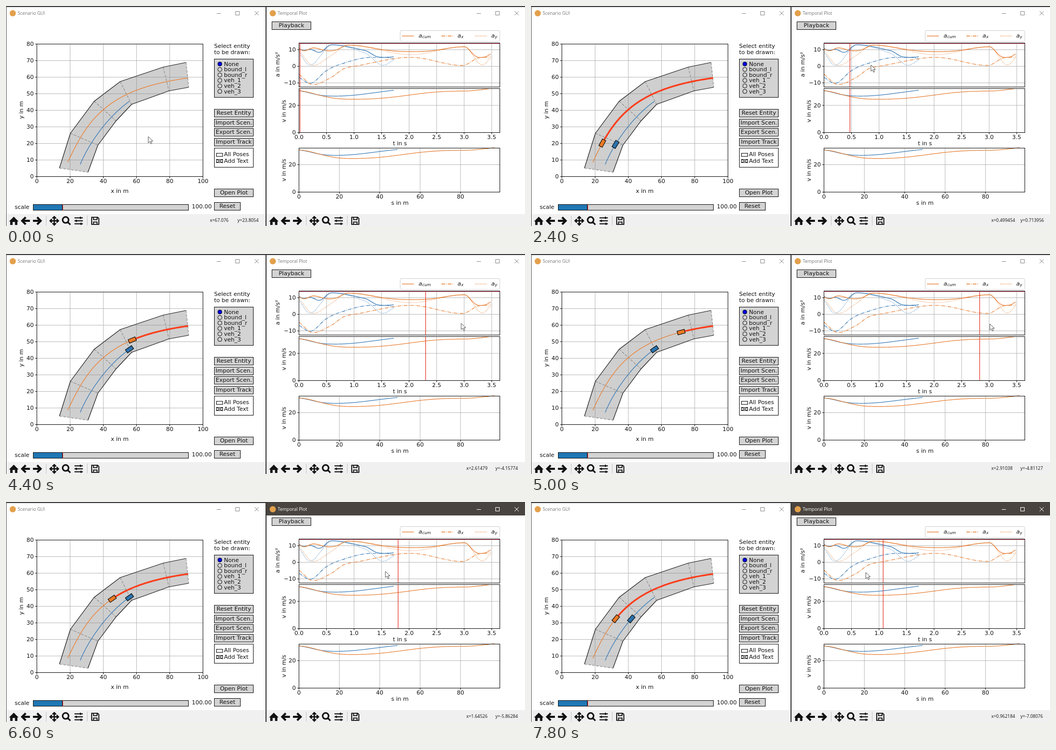
Write an HTML page with a canvas that moves like this. It is 1000 px wide and 425 px high and loops after 8 s.

```html
<!DOCTYPE html>
<html>
<head>
<meta charset="utf-8">
<style>
html, body { margin: 0; width: 100%; height: 100%; overflow: hidden; background: #fff; }
canvas { display: block; }
svg { position: absolute; width: 0; height: 0; }
</style>
</head>
<body>
<canvas id="stage" width="1000" height="425"></canvas>
<svg>
  <path id="inner" d="M143 306C160 264 198 212 238 184"/>
  <path id="outer" d="M119 302C160 213 200 160 351 139"/>
</svg>
<script>
const g = document.getElementById('stage').getContext('2d');
const LOOP = 8000, STEP = 200, ENTER = 1400, FOCUS = 5200, SAMPLES = 240;
const ORANGE = '#e8833a', BLUE = '#3f7fb8', GREY = '#d3d3d3', RED = '#e23b30';
const SANS = '"DejaVu Sans", sans-serif', UI = '"Open Sans", sans-serif';
const DASHDOT = [7, 2, 1.2, 2], DOTTED = [1.2, 2];

const segment = (rows, at) =>
  Math.max(0, Math.min(rows.length - 2, rows.findIndex(r => r[0] > at) - 1 + (at >= rows.at(-1)[0] ? rows.length : 0)));

// Monotone cubic through [key, value] points, so peaks never overshoot.
function spline(rows, at) {
  const i = segment(rows, at), [a, y] = rows[i], [b, z] = rows[i + 1], h = b - a, u = (at - a) / h;
  const secant = k => (rows[k + 1][1] - rows[k][1]) / (rows[k + 1][0] - rows[k][0]);
  const slope = k => {
    if (k === 0) return secant(0);
    if (k === rows.length - 1) return secant(k - 1);
    const p = secant(k - 1), q = secant(k);
    return p * q > 0 ? 2 * p * q / (p + q) : 0;
  };
  const m = slope(i) * h, n = slope(i + 1) * h, d = z - y;
  return y + u * (m + u * (3 * d - 2 * m - n + u * (m + n - 2 * d)));
}

// Speed is the integral of a_x, distance the integral of speed, position the distance along the path.
function drive({ id, color, fill, end, ax, ay }) {
  const path = document.getElementById(id), dt = end / SAMPLES, trace = [];
  let v = 30.8, s = 0;
  for (let i = 0; i <= SAMPLES; i++) {
    const t = i * dt, state = { t, v, s, ax: spline(ax, t), ay: spline(ay, t) };
    trace.push(state);
    v += state.ax * dt;
    s += v * dt;
  }
  const scale = path.getTotalLength() / trace[SAMPLES].s;
  for (const state of trace) {
    const { x, y } = path.getPointAtLength(state.s * scale);
    state.at = [x, y];
  }
  return { color, fill, trace, index: t => Math.min(SAMPLES, Math.round(t / dt)) };
}

const vehicles = [
  {
    id: 'inner', color: BLUE, fill: '#2b73b0', end: 1.72,
    ax: [[0, -6.7], [.2, -10.2], [.5, -2.6], [.71, .8], [1.32, 5.4], [1.6, 5.3], [1.72, 4.3]],
    ay: [[0, 8.5], [.2, .7], [.6, 13], [1.2, 8], [1.53, .6], [1.72, 3.8]]
  },
  {
    id: 'outer', color: ORANGE, fill: '#ec7a24', end: 3.48,
    ax: [[0, -4.8], [.26, -11.1], [.57, -7], [.85, -1], [1.04, .2], [2.03, 5.4], [2.97, .5], [3.28, 5.2], [3.48, 5.6]],
    ay: [[0, 9.5], [.26, .5], [.57, 6.2], [.9, 12.8], [2.03, 7], [3, 11.8], [3.33, .8], [3.48, 5]]
  }
].map(drive);

// time, pointer x and y, readout x and y, scrub position
const moves = [
  [0, 274.1432, 253.32272, 0, 0, .02],
  [1400, 568, 140, 0, 0, .02],
  [2400, 655, 115, .499454, .713956, .47],
  [3400, 773, 121, 1.76278, -1.47831, 1.66],
  [4400, 877, 135, 2.61479, -4.15774, 2.3],
  [5000, 884, 136, 2.91038, -4.81127, 2.83],
  [5600, 846, 131, 2.70293, -4.64484, 2.95],
  [6600, 731, 135, 1.64526, -5.86284, 1.8],
  [7800, 645, 137, .962184, -7.08076, 1.07]
];

function pose(time) {
  const i = segment(moves, time), [a, ...from] = moves[i], [b, ...to] = moves[i + 1];
  return from.map((v, k) => v + (to[k] - v) * (time - a) / (b - a));
}

const leftBound = [[103, 313], [124, 246], [170, 184], [220, 146], [303, 118], [347, 109]];
const rightBound = [[158, 321], [177, 269], [212, 222], [242, 190], [314, 164], [352, 157]];

function text(s, x, y, align = 'center', color = '#111', font = '11px ' + SANS) {
  g.font = font;
  g.textAlign = align;
  g.fillStyle = color;
  g.fillText(s, x, Math.round(y + 3.6));
}

function upright(s, x, y) {
  g.save();
  g.translate(x, y);
  g.rotate(-Math.PI / 2);
  text(s, 0, 0);
  g.restore();
}

function line(points, color = '#000', width = 1, dash = []) {
  g.beginPath();
  points.forEach(p => g.lineTo(...p));
  g.strokeStyle = color;
  g.lineWidth = width;
  g.setLineDash(dash);
  g.stroke();
  g.setLineDash([]);
}

function box(x, y, w, h, fill, stroke = '#111') {
  g.fillStyle = fill;
  g.fillRect(x, y, w, h);
  g.strokeStyle = stroke;
  g.lineWidth = 1;
  if (stroke) g.strokeRect(x + .5, y + .5, w - 1, h - 1);
}

function button(label, x, y, w) {
  box(x, y, w, 16, GREY);
  text(label, x + w / 2, y + 7);
}

// Ticks are [pixel, label]; an empty label leaves only the grid line.
const ticks = (n, start, gap, label) => Array.from({ length: n }, (_, i) => [start + i * gap, label(i)]);

function axes(x, y, w, h, xs, ys, draw) {
  xs.forEach(([p]) => line([[p, y], [p, y + h]], '#b4b4b4', .9));
  ys.forEach(([p]) => line([[x, p], [x + w, p]], '#b4b4b4', .9));
  draw();
  g.strokeStyle = '#111';
  g.lineWidth = 1;
  g.strokeRect(x, y, w, h);
  xs.filter(([, s]) => s !== '').forEach(([p, s]) => {
    line([[p, y + h], [p, y + h + 3]]);
    text(s, p, y + h + 9);
  });
  ys.forEach(([p, s]) => {
    line([[x - 3, p], [x, p]]);
    text(s, x - 6, p, 'right');
  });
}

function titleBar(x, title, active) {
  if (active) box(x, 1, 498, 25, '#49443f', null);
  const color = active ? '#fff' : '#8c8c8c';
  g.fillStyle = '#e3a04c';
  g.beginPath();
  g.arc(x + 12, 14, 6, 0, 7);
  g.fill();
  text(title, x + 21.5, 13.5, 'left', active ? '#fff' : '#777', '8.75px ' + UI);
  line([[x + 405, 14.5], [x + 413, 14.5]], color);
  g.strokeRect(x + 441.5, 10.5, 7, 7);
  line([[x + 478, 10], [x + 486, 18]], color);
  line([[x + 486, 10], [x + 478, 18]], color);
}

// Each icon is a centre, an outline and a stroke width, where 0 means filled.
const icons = [
  [15, 'M0-7-8 1h2v6h4V2h4v5h4V1h2z', 0],
  [38, 'M0-6-6 0 0 6M-6 0H7', 3.4],
  [60, 'M0-6 6 0 0 6M6 0H-7', 3.4],
  [93, 'M-7 0H7M0-7V7M-3-4 0-7 3-4M-3 4 0 7 3 4M-4-3-7 0-4 3M4-3 7 0 4 3', 2.2],
  [116, 'M4-1.5A5 5 0 1 1-6-1.5 5 5 0 1 1 4-1.5M2.5 2 7 6.5', 2.6],
  [140, 'M-7-5H7M-7 0H7M-7 5H7M3-7v4M-4-2v4M4 3v4', 1.8],
  [172, 'M-6-6H4L6-4V6H-6zM-3-6v4H3v-4M-3 6V2H3v4', 1.6]
].map(([x, d, width]) => [x, new Path2D(d), width]);

function toolbar(x) {
  box(x + 1, 402, 499, 23, '#f0f0f0', null);
  for (const [dx, shape, width] of icons) {
    g.save();
    g.translate(x + dx, 415);
    g.scale(1.15, 1.15);
    g.strokeStyle = g.fillStyle = '#111';
    g.lineWidth = width;
    width ? g.stroke(shape) : g.fill(shape);
    g.restore();
  }
  for (const dx of [77.5, 156.5]) line([[x + dx, 405], [x + dx, 424]], '#c4c4c4');
}

function readout(x, y, px, py) {
  const show = (name, v, at) =>
    text(`${name}=${Number(v.toPrecision(6))}`, at, 413.5, 'left', '#111', '8.5px ' + UI);
  show('x', x, px);
  show('y', y, py);
}

function car({ trace, fill, index }, t) {
  const i = index(t), a = trace[Math.max(i - 2, 0)].at, b = trace[Math.min(i + 2, SAMPLES)].at;
  g.save();
  g.translate(...trace[i].at);
  g.rotate(Math.atan2(b[1] - a[1], b[0] - a[0]));
  g.fillStyle = fill;
  g.fillRect(-7.2, -3.7, 14.4, 7.4);
  g.strokeStyle = '#111';
  g.lineWidth = 1.2;
  g.strokeRect(-7.2, -3.7, 14.4, 7.4);
  g.restore();
}

function track(t, scrubbing) {
  g.beginPath();
  [...leftBound, ...[...rightBound].reverse()].forEach(p => g.lineTo(...p));
  g.fillStyle = 'rgba(128,128,128,.38)';
  g.fill();
  leftBound.forEach((p, i) => line([p, rightBound[i]], '#999', 1.4, [5, 2.5]));
  line(leftBound, '#222', 1.2);
  line(rightBound, '#222', 1.2);
  vehicles.forEach(v => line(v.trace.map(q => q.at), v.color, 1.3));
  if (!scrubbing) return;
  const lead = vehicles[1];
  line(lead.trace.slice(lead.index(t)).map(q => q.at), '#f93e1c', 3.2);
  vehicles.forEach(v => car(v, t));
}

function scenario(t, scrubbing) {
  axes(59.5, 73.5, 320, 256, ticks(6, 59.5, 64, i => i * 20), ticks(9, 329.5, -32, i => i * 10),
    () => track(t, scrubbing));
  text('x in m', 219, 357);
  upright('y in m', 29, 201);

  text('Select entity', 401, 77, 'left');
  text('to be drawn:', 401, 89, 'left');
  box(401, 102, 76, 75, GREY);
  ['None', 'bound_l', 'bound_r', 'veh_1', 'veh_2', 'veh_3'].forEach((s, i) => {
    const y = 112 + i * 10.6;
    g.beginPath();
    g.arc(412, y, 4, 0, 7);
    g.fillStyle = i ? GREY : '#0000f0';
    g.fill();
    g.strokeStyle = '#111';
    g.stroke();
    text(s, 420, y, 'left');
  });
  ['Reset Entity', 'Import Scen.', 'Export Scen.', 'Import Track']
    .forEach((s, i) => button(s, 401, Math.round(199 + i * 18.7), 76));
  box(401, 274, 76, 38, '#fff');
  box(405, 284, 13, 7, '#fff');
  box(405, 296, 13, 7, '#fff');
  line([[405, 296], [418, 303]]);
  line([[405, 303], [418, 296]]);
  text('All Poses', 420, 286.5, 'left');
  text('Add Text', 420, 299, 'left');
  button('Open Plot', 401, 353, 76);
  button('Reset', 401, 379, 51);
  text('scale', 45, 388, 'right');
  box(52, 383, 300, 12, GREY);
  box(52, 383, 57, 12, '#1f77b4');
  line([[109.5, 383], [109.5, 395]], '#d03030');
  text('100.00', 358, 387, 'left');
}

function legend() {
  g.strokeStyle = '#d0d0d0';
  g.lineWidth = 1;
  g.beginPath();
  g.roundRect(759.5, 47.5, 192, 21, 2);
  g.stroke();
  [[763, 795, 'cum', []], [839, 870, 'x', DASHDOT], [904, 935, 'y', DOTTED]].forEach(([x, tx, sub, dash]) => {
    line([[x, 58], [x + 23, 58]], ORANGE, 1.3, dash);
    text('a', tx, 57, 'left', '#111', 'italic 11px ' + SANS);
    text(sub, tx + 7, 58.5, 'left', '#111', 'italic 7.7px ' + SANS);
  });
}

function temporal(t) {
  const LEFT = 564.5, WIDTH = 387, HEIGHT = 85;
  const X = s => LEFT + s * 106.1, A = a => 116.5 - a * 3.2;
  const seconds = ticks(8, LEFT, 53.05, i => (i / 2).toFixed(1));
  const curves = (point, width, dash) =>
    vehicles.forEach(({ trace, color }) => line(trace.map(point), color, width, dash));

  button('Playback', 512, 30, 76);
  legend();
  axes(LEFT, 71.5, WIDTH, HEIGHT, seconds.map(([p]) => [p, '']), ticks(3, 84.5, 32, i => ['10', '0', '−10'][i]), () => {
    curves(q => [X(q.t), A(Math.hypot(q.ax, q.ay))], 1.3);
    curves(q => [X(q.t), A(q.ax)], 1.2, DASHDOT);
    curves(q => [X(q.t), A(q.ay)], 1.1, DOTTED);
  });
  line([[LEFT, 72.5], [LEFT + WIDTH, 72.5]], '#c2405a');
  axes(LEFT, 159.5, WIDTH, HEIGHT, seconds, ticks(2, 244.5, -52.5, i => i * 20), () =>
    curves(q => [X(q.t), 244.5 - q.v * 2.63], 1.2));
  axes(LEFT, 274.5, WIDTH, HEIGHT, ticks(5, LEFT, 77.8, i => i * 20), ticks(2, 359.5, -53, i => i * 20), () =>
    curves(q => [LEFT + q.s * 3.89, 359.5 - q.v * 2.65], 1.2));

  const scrub = Math.floor(X(t)) + .5;
  for (const top of [72, 160]) line([[scrub, top], [scrub, top + HEIGHT - 1]], RED, 1.2);

  text('t in s', 759, 265);
  text('s in m', 759, 380);
  upright('a in m/s²', 523, 113);
  upright('v in m/s', 535, 203);
  upright('v in m/s', 535, 317);
}

const arrow = new Path2D('M0 0V12L3 9.4 5 14 7 13 5 8.7H9z');

function pointer(x, y) {
  g.save();
  g.translate(x, y);
  g.fillStyle = '#fff';
  g.fill(arrow);
  g.strokeStyle = '#444';
  g.lineWidth = .9;
  g.stroke(arrow);
  g.restore();
}

function draw(time) {
  const [px, py, rx, ry, t] = pose(time), scrubbing = time > ENTER;
  box(0, 0, 1000, 425, '#fff', null);
  box(0, 0, 1000, 2, '#3a3a3a', null);
  box(0, 0, 1, 425, '#555', null);
  box(500, 0, 2, 425, '#3a3a3a', null);
  titleBar(1, 'Scenario GUI', false);
  titleBar(502, 'Temporal Plot', time >= FOCUS);
  toolbar(0);
  toolbar(501);
  scenario(t, scrubbing);
  temporal(t);
  if (px < 379) readout((px - 59.5) / 3.2, (329.5 - py) / 3.2, 393, 446);
  if (scrubbing) readout(rx, ry, 887, 943);
  pointer(px, py - 1);
}

let shown = -1;
function tick() {
  const time = Math.floor(performance.now() % LOOP / STEP) * STEP;
  if (time !== shown) draw(shown = time);
  requestAnimationFrame(tick);
}
tick();
</script>
</body>
</html>
```
